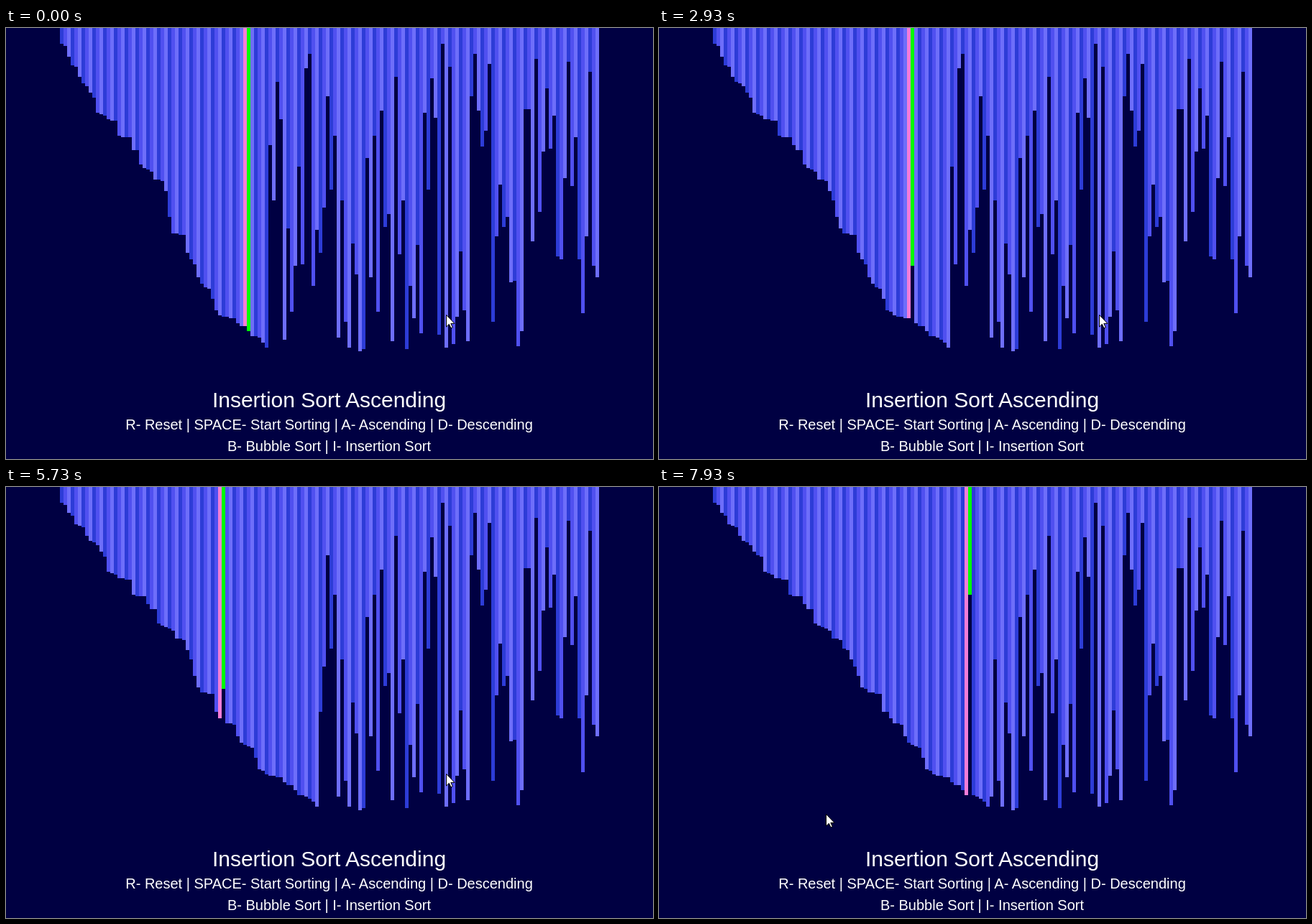
An HTML page for the animation above (8 s loop, 900 by 600 pixels).

```html
<!DOCTYPE html>
<html lang="en">
<head>
<meta charset="utf-8">
<title>Insertion Sort</title>
<style>
html, body { margin: 0; width: 100%; height: 100%; overflow: hidden; background: #000042; }
svg { display: block; width: 100vw; height: 100vh; }
text { font-family: "Liberation Sans", Arial, sans-serif; font-size: 20px; fill: #fff; text-anchor: middle; }
</style>
</head>
<body>
<svg viewBox="0 0 900 600">
  <rect width="900" height="600" fill="#000042"/>
  <g id="bars" shape-rendering="crispEdges"></g>
  <text x="449.5" y="528" style="font-size:30px">Insertion Sort Ascending</text>
  <text x="449.5" y="559">R- Reset | SPACE- Start Sorting | A- Ascending | D- Descending</text>
  <text x="449.5" y="589">B- Bubble Sort | I- Insertion Sort</text>
  <path id="cursor" d="M.5 .5V17L4.3 13.3 7 18.8 9.3 17.8 6.8 12.4H12Z" fill="#fff" stroke="#000"/>
</svg>
<script>
const LOOP = 8000, FPS = 15, BAR = 5, LEFT = 75;
const SHADES = ['#2d3cd7', '#5050f0', '#6e6efa'];
const KEY = '#00ff00', NEIGHBOUR = '#f57dd7';

const sorted = [
  22, 25, 40, 52, 54, 68, 77, 81, 90, 97, 118, 120, 122, 127, 129, 129, 150, 152, 152, 152,
  170, 170, 190, 195, 197, 200, 211, 211, 213, 227, 263, 286, 286, 288, 288, 313, 322, 329, 347, 356,
  361, 363, 377, 393, 400, 402, 402, 404, 404, 411, 415, 415, 422, 429, 429, 431, 438, 445
];
const unsorted = [
  163, 240, 75, 127, 434, 279, 395, 331, 193, 329, 56, 36, 359, 281, 313, 250, 95, 225, 150, 431,
  240, 409, 445, 300, 343, 450, 447, 181, 347, 150, 395, 115, 277, 259, 436, 68, 315, 240, 447, 359,
  404, 302, 425, 118, 225, 70, 125, 427, 22, 445, 54, 440, 402, 311, 393, 436, 95, 36, 115, 165,
  143, 50, 409, 290, 218, 277, 263, 354, 352, 443, 422, 113, 113, 297, 43, 256, 172, 84, 168, 122,
  318, 322, 209, 47, 220, 152, 322, 397, 290, 61, 331, 347
];

// [tick, swaps done]; flat stretches are short stalls
const pace = [
  [0, 0], [2, 12], [4, 12], [5, 18], [13, 69], [14, 75], [16, 75], [17, 81], [18, 81], [31, 150],
  [38, 196], [39, 196], [52, 260], [53, 260], [57, 288], [62, 319], [63, 319], [75, 402], [76, 408],
  [77, 422], [78, 422], [91, 504], [92, 510], [93, 510], [96, 528], [105, 579], [106, 579],
  [113, 618], [114, 618], [119, 647]
];
// [tick, x, y]
const pointer = [[0, 612, 399], [98, 612, 399], [105, 340, 510], [111, 232, 455], [120, 232, 455]];

const smooth = u => u * u * (3 - 2 * u);

function sample(keys, tick, col, ease = u => u) {
  const n = keys.findIndex(k => k[0] >= tick);
  if (n <= 0) return keys[0][col];
  const a = keys[n - 1], b = keys[n];
  return a[col] + (b[col] - a[col]) * ease((tick - a[0]) / (b[0] - a[0]));
}

// Insertion sort replayed for a given number of swaps
function sortState(swaps) {
  const list = [...sorted, ...unsorted];
  let at = 52;
  for (let i = sorted.length; i < list.length; i++) {
    for (let j = i; j > 0 && list[j - 1] > list[j]; j--) {
      if (swaps-- === 0) return { list, at };
      [list[j - 1], list[j]] = [list[j], list[j - 1]];
      at = j - 1;
    }
  }
  return { list, at };
}

const group = document.getElementById('bars');
const cursor = document.getElementById('cursor');
const bars = [...sorted, ...unsorted].map((_, i) => {
  const r = document.createElementNS('http://www.w3.org/2000/svg', 'rect');
  r.setAttribute('x', LEFT + i * BAR);
  r.setAttribute('width', BAR);
  return group.appendChild(r);
});

function draw(ms) {
  const tick = Math.min(119, Math.floor((ms + 5) * FPS / 1000));
  const { list, at } = sortState(Math.round(sample(pace, tick, 1)));
  bars.forEach((bar, i) => {
    bar.setAttribute('height', list[i]);
    bar.setAttribute('fill', i === at ? KEY : i === at - 1 ? NEIGHBOUR : SHADES[i % 3]);
  });
  const [x, y] = [1, 2].map(c => Math.round(sample(pointer, tick, c, smooth)));
  cursor.setAttribute('transform', `translate(${x} ${y})`);
}

const start = performance.now();
function loop() {
  draw((performance.now() - start) % LOOP);
  requestAnimationFrame(loop);
}
loop();
</script>
</body>
</html>
```
